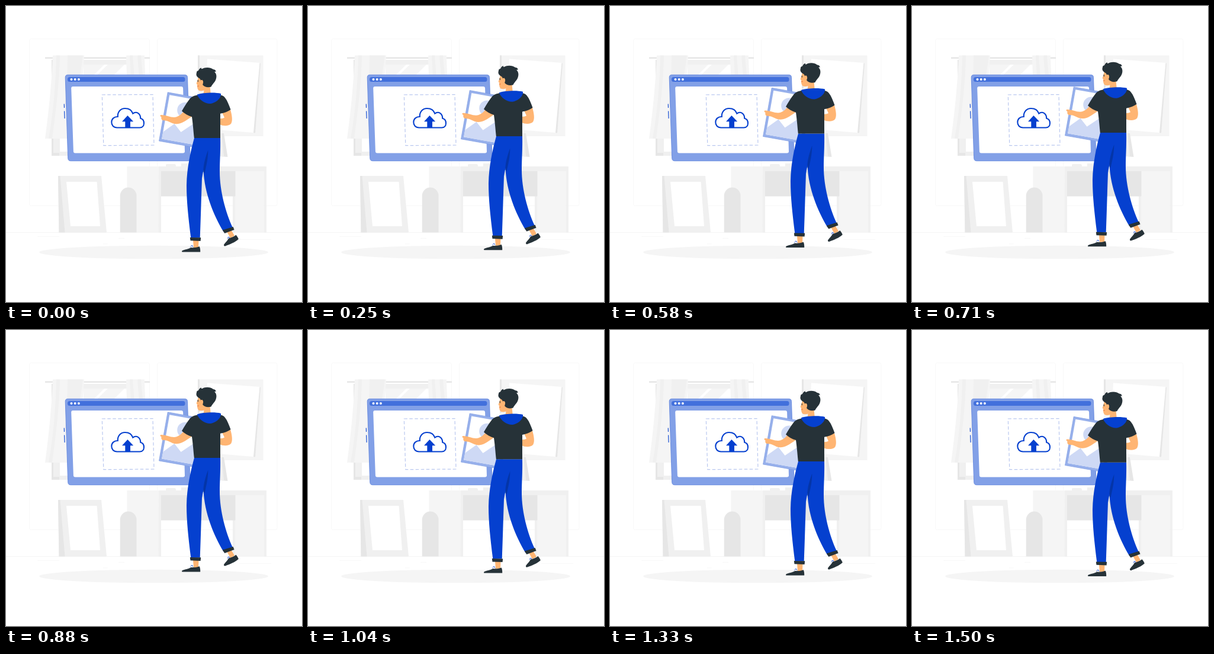
An HTML page that plays this animation: 500x500 px, repeating every 1.54 s.

```html
<!DOCTYPE html>
<html lang="en">
<head>
<meta charset="utf-8">
<title>Image upload</title>
<style>
  html, body { margin: 0; width: 100%; height: 100%; overflow: hidden; background: #fff; }
  svg { display: block; width: 100%; height: 100%; }
  .blue { fill: #0540cf; }
  .dark { fill: #263238; }
  .skin { fill: #ffb573; }
  .g1 { fill: #f5f5f5; }
  .g2 { fill: #f0f0f0; }
  .g3 { fill: #e6e6e6; }
  .paper { fill: #fff; }
</style>
</head>
<body>
<svg viewBox="0 0 500 500">
  <!-- walls and floor -->
  <g fill="none" stroke="#f7f7f7" stroke-width=".8">
    <rect x="39.5" y="55.5" width="203" height="282" rx="3"/>
    <rect x="255.5" y="55.5" width="202.500" height="282" rx="3"/>
  </g>
  <path d="M0 382.500H500" stroke="#f0f0f0" stroke-width=".7"/>
  <path d="M53 389.500H90M164 402H172M190 392.500H200M394 394.500H448" stroke="#f5f5f5" stroke-width=".7"/>
  <ellipse class="g1" cx="249.500" cy="416" rx="193.500" ry="11.300"/>

  <!-- window with curtains -->
  <path class="g2" d="M77 91H233V253H77Z"/>
  <path class="g3" d="M77 91H80V248H90V253H77Z"/>
  <path class="paper" d="M91 99H223V246H91Z"/>
  <path class="g1" d="M131 99H166L131 134ZM172 99H200L160 139H131Z"/>
  <path class="g3" d="M66 86.500H243V89H66Z"/>
  <path class="g1" d="M79 83.500H132C130 130 122 180 108 224H66C72 180 77 132 79 83.500Z"/>
  <path class="g2" d="M85 83.500H91C90 132 84 180 78 224H72C80 180 84 132 85 83.500ZM104 83.500H130C127 110 121 140 112 170H98C102 140 104 112 104 83.500Z"/>
  <path class="g1" d="M203 83.500H234C235 135 239 180 246 224H214C207 180 204 135 203 83.500Z"/>
  <path class="g2" d="M209 83.500H214L220 160H213ZM222 83.500H228L235 160H228Z"/>

  <!-- wall picture -->
  <path class="g1" d="M324 83.500H434.500V220H324Z"/>
  <path class="g3" d="M324 83.500H327V140H324ZM428 96L430 97L421 214.500L417 214Z"/>
  <path class="paper" d="M340 89.500L428.500 96L418 214L333 207Z"/>
  <path class="g3" d="M362 215H368L374.500 255L352 253Z"/>
  <path class="g2" d="M362 215H364.500L368 254.500L352 253Z"/>

  <!-- desk -->
  <path class="g1" d="M204.500 271H258V382.500H204.500ZM387 279H435.500V382.500H387Z"/>
  <path class="g2" d="M258 271H440V382.500H435.500V279H262V382.500H257.500ZM383 321H387V382.500H383Z"/>
  <path class="g3" d="M262 279H387.500V321.500H262Z"/>
  <path class="g2" d="M270 271V268.500Q270 267 272 267H285Q287 267 287 271ZM296 266H310V271H296Z"/>

  <!-- leaning frame and arch -->
  <path class="g2" d="M88 287H161L170 382.500H89.500Z"/>
  <path class="g3" d="M88 287H91.500L99.500 382.500H89.500Z"/>
  <path class="paper" d="M102 297H153.500L159 372H109Z"/>
  <path class="g3" d="M192.700 382.500V320.500A13.900 13.900 0 0 1 220.500 320.500V382.500Z"/>

  <!-- upload panel -->
  <path d="M104.500 116.300H302Q306.300 116.300 306.500 120.500L311 257.500Q311 261.700 307 261.700H109.500Q105 261.700 104.700 257.500L100.200 120.500Q100.200 116.300 104.500 116.300Z" fill="#82a0e7" stroke="#5b80dc" stroke-width=".8"/>
  <rect x="104" y="120" width="198.500" height="8" rx="3.500" fill="#4270dc"/>
  <g class="paper"><circle cx="110.500" cy="123.900" r="2"/><circle cx="116.700" cy="123.900" r="2"/><circle cx="122.900" cy="123.900" r="2"/></g>
  <path class="paper" d="M113 136H296Q299 136 299.100 139L302 245.500Q302 248.500 299 248.500H117Q114 248.500 113.900 245.500L110.200 139Q110.200 136 113 136Z"/>
  <path d="M98.200 165.500L98.500 172M98.600 177.500L99.100 190" stroke="#0540cf" stroke-width="1.100"/>
  <path d="M162.300 150L248 149.500L250 235L164.800 235.700Z" fill="none" stroke="#b9c7ef" stroke-width="1.200" stroke-dasharray="5.500 3.500"/>
  <path d="M187.500 205.500C181.500 205.500 178.300 201.300 178.300 196.300C178.300 190.500 183 186.700 188.800 187C188.300 178.500 194 173 201 173C207.500 173 212.500 176.300 214.300 181.700C220 177 227.300 181.500 227.200 189.700C231.200 190.600 233 194.300 233 198C233 202.800 230 205.500 226 205.500Z" fill="none" stroke="#0540cf" stroke-width="2.100"/>
  <path class="blue" d="M205.400 185L215.200 195.200H210V205.500H201.300V195.200H196Z"/>

  <!-- man with picture -->
  <g id="man">
    <path d="M273.200 145.800L341 158L326 240L258.500 228Z" fill="#97b0eb" stroke="#7f9de4" stroke-width=".7"/>
    <path class="paper" d="M276.300 150.300L336 161L322 235L263.200 224.500Z"/>
    <g fill="#ced9f5">
      <circle cx="302.500" cy="176" r="13.300"/>
      <path d="M265.500 212.500L284.500 199L295.500 213L318 198L322 235L263.200 224.500Z"/>
    </g>

    <!-- shoes and ankles -->
    <path class="skin" d="M316 396H325.500L325 408H317ZM373.500 382L380.500 378.500L386 388L379 392Z"/>
    <path class="dark" d="M297 414.300C297.500 412 306 411.500 312.500 408C317 408.500 322 408 326.800 406.300C328 409 328.300 412 328.200 415.500H298Q297 415.500 297 414.300Z"/>
    <path class="dark" d="M368 404.300C367.500 402 373.500 398 376 392.500C380.500 391.500 385 389.500 388.500 386.800C390.500 389 392 391.300 392.800 393.800C387 399.500 378 402.500 370.500 405.500Q368.500 406 368 404.300Z"/>
    <path d="M311 407.500L314 404.500L316.500 407.500M312.500 404.500L316 405.500M374 393.500L375.500 390L378.500 392M374.500 391L378 390.500" fill="none" stroke="#3f6bdb" stroke-width=".8"/>

    <!-- trousers -->
    <path class="blue" d="M333 223.100H362C362.500 245 361 262 361 280C361 312 371 349 383 374.500L367.500 381.500C351 354 335 316 333.500 277L331 291C329.800 326 329 357 327.700 391.500H312.300C308 357 305 330 305 303C305.500 273 312 245 318 223.100Z"/>
    <path d="M341.300 243.500C337.500 254 333.500 266 333.300 280L335.500 283C338 271 341.500 258 341.300 243.500Z" fill="#0435a8"/>
    <path class="dark" d="M310.800 391L329.200 391.300L328.600 397L311.500 396.300ZM365.800 378.500L383.700 373L385.500 378L369.300 384Z"/>

    <!-- arms -->
    <path class="skin" d="M300 178C295 184.500 290 187.500 284 188C277 188 270 184 262 184C259.800 184.300 260.200 186.300 262.500 187.500C261.800 190.300 263 193.300 266 193.200C272 193 276.500 196 281 198C287 200.300 293 199.300 298 196.800C304 193.800 309 190 315 186Z"/>
    <path class="skin" d="M365 180L369 188.500C366 190.500 364 189.500 361.500 190.500L361 200C367 203.300 377 203 380.300 198.500C383 194 382 185 379 175Z"/>

    <!-- head -->
    <path class="skin" d="M325.500 119C324 123 323.500 126 321.800 130.500C321.500 132 322.600 132.300 323.200 132.700C322.800 135 323 137.500 323.800 140C325 144 330 144 334.500 142.500L333 152C337 155 342 155 346 151L344.500 135L347 118Z"/>
    <path d="M324.300 125.500V127.800" stroke="#263238" stroke-width="1.100" stroke-linecap="round"/>
    <path d="M323.200 135.300L325.600 135.100" stroke="#e0683f" stroke-width=".9"/>
    <path class="dark" d="M324 120.500C321.500 118.500 320.800 115.500 322 112.500C321.500 110.500 323.500 109.500 325 109.300C326.500 106 328.500 104.500 330 104.300C329.500 106 330.500 106.500 331.500 106C336 103.300 345 102.800 350 107C353.500 107.300 354.800 109 354.500 111.500C353.500 110.500 353 110.500 352.300 111.300C356 115 356 120 354.500 124C353 129 349 131 346.500 136.500C341 138.300 335.500 137 332.300 133.300C332.500 129 333 126.500 331.500 124.800L328.800 125.500C328.500 123 327 122.500 324 120.500Z"/>
    <ellipse class="skin" cx="330.500" cy="128.700" rx="2.600" ry="3.200"/>

    <!-- shirt and hood -->
    <path class="dark" d="M323 150.500C317 151.500 313 153.500 310 157.500C305 163.500 301 170.500 297 177.500C301.500 182 307.500 185 314 187.200C315.500 197 316.500 210 317.800 223.100H362V181.800C369 180.500 375 178.500 379.500 175C376.500 167 374 160 370 155C368 152.500 366 151.200 363 150.500Z"/>
    <path class="blue" d="M322.800 149.500C331 146.300 354 145.300 363 148C364 155.500 355 163.500 345 165C335 165 325.500 157.500 322.800 149.500Z"/>
  </g>
</svg>
<script>
  const LOOP = 1540, STEPS = 37, STEP = LOOP / STEPS;
  const LOW = 1480, RISE = 10, REST = 9.2;
  const man = document.getElementById('man');

  // Linear bob: lowest at LOW, highest half a loop later.
  function draw(ms) {
    const t = Math.floor((ms % LOOP + 3) / STEP) * STEP;
    const p = ((t - LOW + LOOP) % LOOP) / LOOP;
    const drop = RISE * Math.abs(1 - 2 * p);
    man.setAttribute('transform', `translate(0 ${(drop - REST).toFixed(3)})`);
  }

  let start;
  function tick(now) {
    start ??= now;
    draw(now - start);
    requestAnimationFrame(tick);
  }
  draw(0);
  requestAnimationFrame(tick);
</script>
</body>
</html>
```
